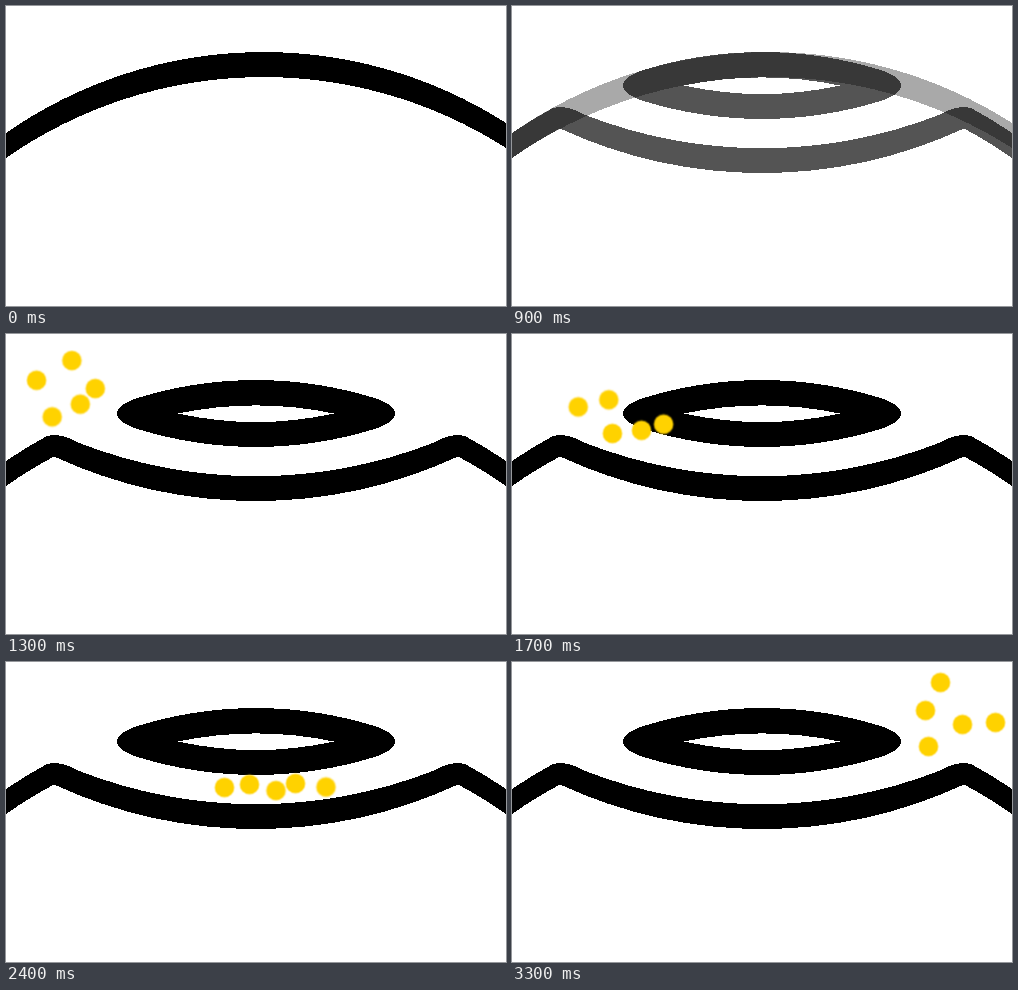
Animation of 500 by 300 pixels, one loop 4 s. Source, as an HTML page:

```html
<!DOCTYPE html>
<html lang="en">
<head>
<meta charset="utf-8">
<title>Gold dots sliding through a channel</title>
<style>
  html, body { margin: 0; width: 100%; height: 100%; overflow: hidden; background: #fff; }
  svg { display: block; width: 500px; height: 300px; }
  .ink { shape-rendering: crispEdges; }
  #channel, #dots { opacity: 0; }
</style>
</head>
<body>
<svg viewBox="0 0 500 300">
  <defs>
    <g id="dot">
      <circle r="10.4" fill="#ffd200" opacity=".3"/>
      <circle r="9.5" fill="#ffd200"/>
    </g>
  </defs>
  <path id="arch" class="ink" d="M0 127A450 450 0 0 1 500 117V142A450 450 0 0 0 0 152Z"/>
  <g id="channel" class="ink">
    <path fill-rule="evenodd"
          d="M130 64.5A400 400 0 0 1 370 64.5Q389 71 389 79.5T370 94.5A400 400 0 0 1 130 94.5Q111 88 111 79.5T130 64.5Z
             M172 79.5A384 384 0 0 1 328 79.5A362 362 0 0 1 172 79.5Z"/>
    <path d="M0 127A450 450 0 0 1 40 102.5Q54 98 72 108.5A487 487 0 0 0 428 108.5
             Q446 98 460 102.5A450 450 0 0 1 500 127V152A450 450 0 0 0 452 122.5
             A480 480 0 0 1 48 122.5A450 450 0 0 0 0 152Z"/>
  </g>
  <g id="dots" transform="translate(.5 .5)"></g>
</svg>
<script>
const LOOP = 4000, TICK = 100;
const timing = { duration: LOOP, iterations: Infinity };
const byId = id => document.getElementById(id);
const mix = (a, b, u) => a + (b - a) * u;

// Each dot: scattered start, channel entry, channel exit, scattered end.
const paths = [
  [[25, 42], [100, 98], [336, 120], [416, 84]],
  [[61, 20.5], [126, 103], [360, 109], [413, 48]],
  [[38, 80], [152, 115], [387, 109], [450, 62]],
  [[66, 66], [182, 121], [396, 89], [428, 20]],
  [[80, 49], [211, 124], [428, 93], [483, 60]]
];

// Gather with a slow start, follow the dip of the channel, then fly apart.
const stages = [
  { from: 1200, to: 2000, ease: u => u ** 1.3, sag: 0 },
  { from: 2000, to: 2800, ease: u => u, sag: 16 },
  { from: 2800, to: 3300, ease: u => u, sag: 0 }
];

function place(path, time) {
  const i = stages.findIndex(stage => time <= stage.to);
  const { from, to, ease, sag } = stages[i];
  const u = ease((time - from) / (to - from));
  const [a, b] = [path[i], path[i + 1]];
  return [mix(a[0], b[0], u), mix(a[1], b[1], u) + sag * 4 * u * (1 - u)];
}

// Poses advance in hard steps, once per tick, and hold before and after.
function addDot(path) {
  const dot = document.createElementNS('http://www.w3.org/2000/svg', 'use');
  dot.setAttribute('href', '#dot');
  byId('dots').append(dot);
  const frames = [];
  const addFrame = (offset, time) => {
    const [x, y] = place(path, time);
    frames.push({ offset, transform: `translate(${x}px, ${y}px)`, easing: 'steps(1, end)' });
  };
  const start = stages[0].from, end = stages.at(-1).to;
  addFrame(0, start);
  for (let time = start; time <= end; time += TICK) addFrame(time / LOOP, time);
  addFrame(1, end);
  dot.animate(frames, timing);
}

// Cross-fade: six hard steps, the first one taken at once.
function fade(id, from, to) {
  byId(id).animate([
    { offset: 0, opacity: from },
    { offset: 600 / LOOP, opacity: from, easing: 'steps(6, start)' },
    { offset: 1200 / LOOP, opacity: to },
    { offset: 1, opacity: to }
  ], timing);
}

fade('arch', 1, 0);
fade('channel', 0, 1);
byId('dots').animate([
  { offset: 0, opacity: 0, easing: 'steps(1, end)' },
  { offset: stages[0].from / LOOP, opacity: 1 },
  { offset: 1, opacity: 1 }
], timing);
paths.forEach(addDot);
</script>
</body>
</html>
```
